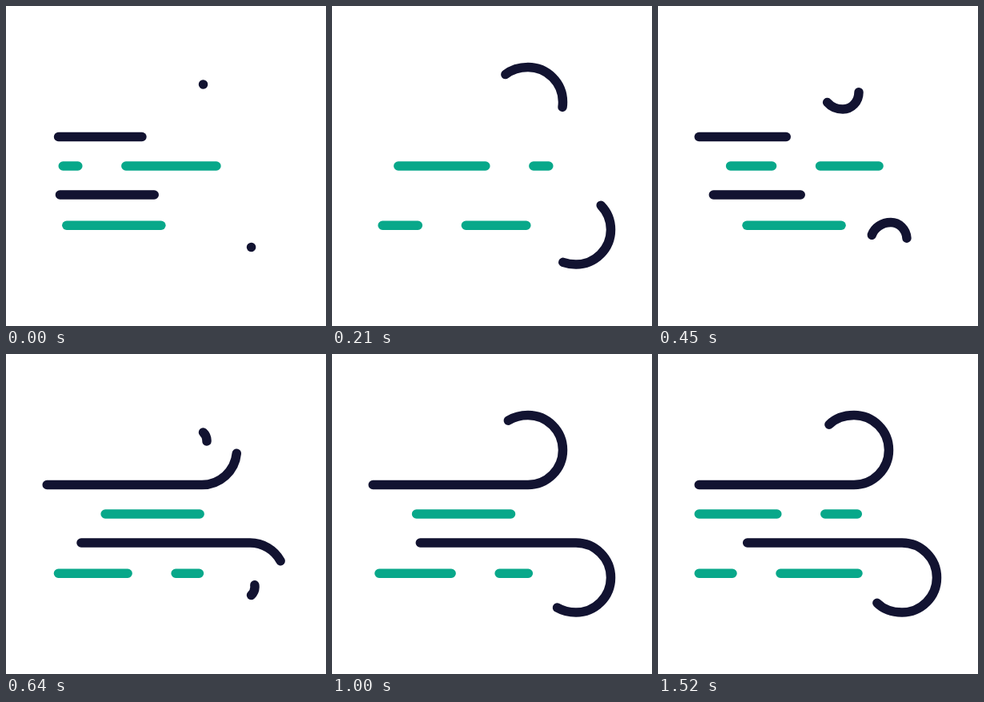
Animation of 400 by 400 pixels, one loop 1.55 s. Source, as an HTML page:

```html
<!DOCTYPE html>
<html lang="en">
<head>
<meta charset="utf-8">
<title>Wind</title>
<style>
  html, body { margin: 0; width: 100%; height: 100%; overflow: hidden; background: #fff; }
  svg { display: block; width: 100vw; height: 100vh; }
  path { fill: none; stroke: #121331; stroke-width: 11.5; stroke-linecap: round; }
  .dashed { stroke: #08a88a; stroke-dasharray: 118 60; }
</style>
</head>
<body>
<svg id="stage" viewBox="0 0 400 400"></svg>
<script>
const LOOP = 1550;
const LEFT = 51.2;
const stage = document.getElementById('stage');

const clamp = v => Math.min(1, Math.max(0, v));
const progress = (t, from, to) => clamp((t - from) / (to - from));
const smooth = x => x * x * (3 - 2 * x);

// Cubic bezier easing (x1, 0, x2, 1)
function bezier(x1, x2) {
  return x => {
    let lo = 0, hi = 1;
    for (let i = 0; i < 24; i++) {
      const p = (lo + hi) / 2, q = 1 - p;
      if (3 * q * q * p * x1 + 3 * q * p * p * x2 + p * p * p < x) lo = p;
      else hi = p;
    }
    return smooth((lo + hi) / 2);
  };
}

const headEase = bezier(0.1, 0.18);
const tailEase = bezier(0.03, 0.28);
const growEase = bezier(0.1, 0.16);

function addPath(d, cls = '') {
  const el = document.createElementNS('http://www.w3.org/2000/svg', 'path');
  el.setAttribute('d', d);
  el.setAttribute('class', cls);
  stage.append(el);
  return el;
}

// Straight line that curls into a spiral; dir 1 curls up, -1 curls down
function gustPath(x, y, dir) {
  const arc = (rx, ry, dx, dy) => `a${rx} ${ry} 0 0 ${dir > 0 ? 0 : 1} ${dx} ${dy * dir}`;
  return `M${LEFT} ${y}H${x}` + arc(43.5, 43.5, 0, -87) + arc(39, 29.5, -39, 29.5) +
    arc(25, 23, 25, 23) + arc(20, 21, 20, -21) + arc(14, 14, -4.5, -10);
}

function makeGust(x, y, dir, restTail, restHead) {
  const d = gustPath(x, y, dir);
  const [fading, passing, settling] = [0, 1, 2].map(() => addPath(d));
  return { fading, passing, settling, restTail, restHead, length: fading.getTotalLength() };
}

function trim(el, length, tail, head) {
  const size = (head - tail) * length;
  el.style.visibility = size > 0.01 ? 'visible' : 'hidden';
  el.style.strokeDasharray = `${Math.max(size, 0.01)} ${length * 2}`;
  el.style.strokeDashoffset = -tail * length;
}

const gusts = [
  makeGust(245, 163.5, 1, 0, 0.782),
  makeGust(305, 236, -1, 0.115, 0.807)
];

// Dashed streams: resting right end, bulge of both ends, resting dash offset
const streams = [
  { y: 200, right: 249.3, growLeft: 39.7, growRight: 27, offset: 77.5 },
  { y: 274.3, right: 250, growLeft: 15, growRight: -9, offset: 21 }
].map(s => ({ ...s, el: addPath('', 'dashed') }));

function draw(t) {
  const head = headEase(progress(t, -80, 596));
  const tail = tailEase(progress(t, -13, 808));
  const grow = growEase(progress(t, 341, 1173));
  for (const g of gusts) {
    trim(g.fading, g.length, 0.998, t < 50 ? 1 : 0.998);
    trim(g.passing, g.length, tail, head);
    trim(g.settling, g.length, g.restTail * grow, g.restHead * grow);
  }

  const bulge = smooth(1 - clamp(Math.abs(t - 505) / 1015));
  const travel = 720.6 * (1 - smooth(progress(t, -510, 1520)));
  for (const s of streams) {
    const right = s.right + s.growRight * bulge;
    const left = LEFT + s.growLeft * bulge;
    s.el.setAttribute('d', `M${right} ${s.y}H${left}`);
    s.el.style.strokeDashoffset = s.offset - travel;
  }
}

const start = performance.now();
function tick() {
  draw((performance.now() - start) % LOOP);
  requestAnimationFrame(tick);
}
tick();
</script>
</body>
</html>
```
